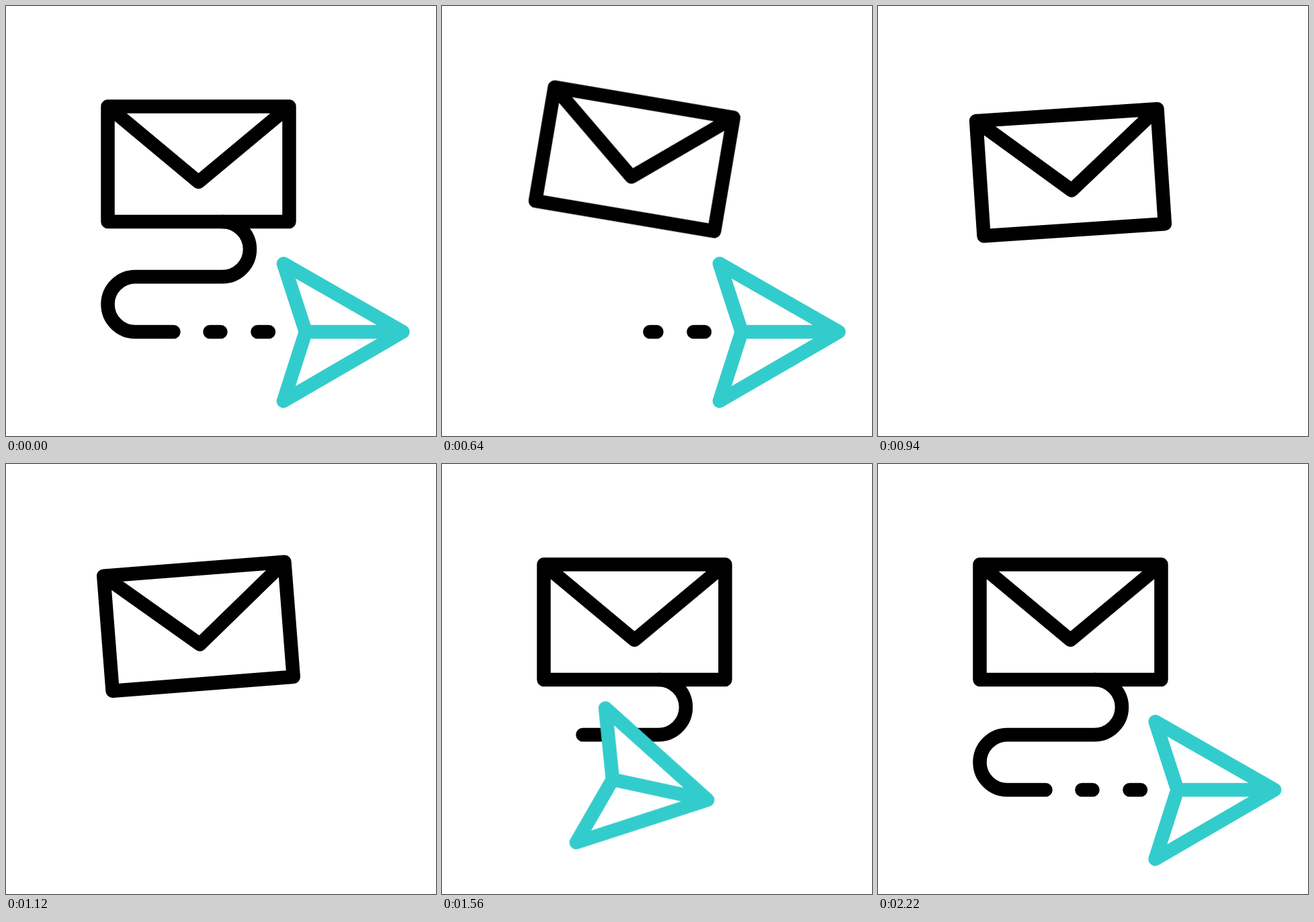
Write an HTML page that moves like this. It is 640x640 px and loops after 2400 ms.

```html
<!DOCTYPE html>
<html lang="en">
<head>
<meta charset="utf-8">
<title>Send mail</title>
<style>
html, body { margin: 0; width: 100%; height: 100%; overflow: hidden; background: #fff; }
svg { display: block; width: 100%; height: 100%; }
path { fill: none; stroke: #000; stroke-width: 20.5; stroke-linecap: round; stroke-linejoin: round; }

svg * {
  animation-duration: 2400ms;
  animation-iteration-count: infinite;
  animation-timing-function: cubic-bezier(.333, 0, .667, 1);
}

.mail { transform-origin: 286.5px 235px; animation-name: bob, tilt; }
.line, .dash1, .dash2 { stroke-dasharray: 1 3; }
.line { animation-name: line; }
.dash1 { animation-name: dash1; }
.dash2 { animation-name: dash2; }
.plane { transform-origin: 502px 485.5px; animation-name: fly, grow, level; }
.plane path { stroke: #33cccc; fill: #fff; }

@keyframes bob {
  0%, 8.333% { translate: 0 0; }
  23.333% { translate: 0 -15px; }
  33.333% { translate: 0 14.5px; }
  58.333%, 100% { translate: 0 0; }
}
@keyframes tilt {
  0%, 14.167% { rotate: 0deg; }
  25.833% { rotate: 10deg; }
  33.333% { rotate: 0deg; }
  42.5% { rotate: -5.4deg; }
  58.333%, 100% { rotate: 0deg; }
}

/* Trails are wiped from their start, then drawn again from there. */
@keyframes line {
  0%, 8.333% { stroke-dashoffset: 0; }
  24.99% { opacity: 1; }
  25% { stroke-dashoffset: -1; opacity: 0; }
  56.66% { opacity: 0; }
  56.667% { stroke-dashoffset: 1; opacity: 1; }
  72.5%, 100% { stroke-dashoffset: 0; }
}
@keyframes dash1 {
  0%, 25% { stroke-dashoffset: 0; }
  29.16% { opacity: 1; }
  29.167% { stroke-dashoffset: -1; opacity: 0; }
  72.49% { opacity: 0; }
  72.5% { stroke-dashoffset: 1; opacity: 1; }
  76.667%, 100% { stroke-dashoffset: 0; }
}
@keyframes dash2 {
  0%, 34.167% { stroke-dashoffset: 0; }
  38.32% { opacity: 1; }
  38.333% { stroke-dashoffset: -1; opacity: 0; }
  76.66% { opacity: 0; }
  76.667% { stroke-dashoffset: 1; opacity: 1; }
  80.833%, 100% { stroke-dashoffset: 0; }
}

@keyframes fly {
  0%, 29.167% { translate: 0 0; }
  43.333% { translate: 310px 0; }
  43.34%, 58.333% { translate: -214px -4px; }
  93.333%, 100% { translate: 0 0; }
}
@keyframes grow {
  0%, 43.32% { scale: 1; }
  43.33%, 56.667% { scale: 0; }
  62.5%, 100% { scale: 1; }
}
@keyframes level {
  0%, 43.333% { rotate: 0deg; }
  43.34%, 58.333% { rotate: 24.6deg; }
  71.667%, 100% { rotate: 0deg; }
}
</style>
</head>
<body>
<svg viewBox="0 0 640 640">
  <path class="line" pathLength="1" d="M322 321a41 41 0 0 1 0 82H192.500a41 41 0 0 0 0 82H249.500"/>
  <path class="dash1" pathLength="1" d="M303.500 485H319.500"/>
  <path class="dash2" pathLength="1" d="M374.500 485H391"/>
  <g class="mail">
    <path d="M151.500 149.500H421.500V321H151.500ZL286.500 262 421.500 149.500"/>
  </g>
  <g class="plane">
    <path d="M446 485 413 383.500 590.500 485 413 588ZH590.500"/>
  </g>
</svg>
</body>
</html>
```
